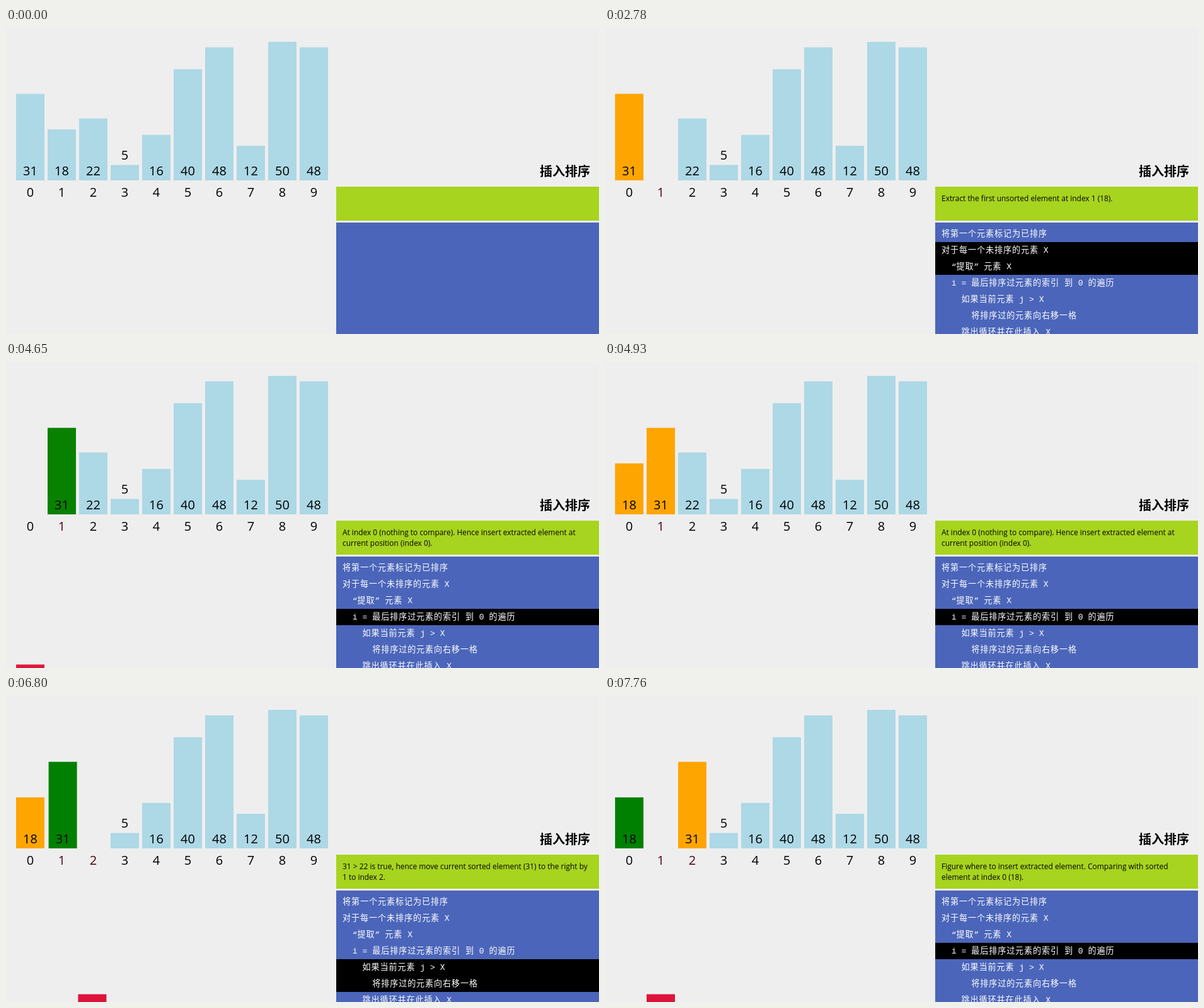
Recreate the animation shown at these times as an HTML page. Size 941x486 px, loop 8 s.

```html
<!DOCTYPE html>
<html lang="zh">
<head>
<meta charset="utf-8">
<title>插入排序</title>
<style>
  html, body { margin: 0; width: 100%; height: 100%; overflow: hidden; background: #eee; }
  svg { display: block; width: 941px; height: 486px; }
  text { white-space: pre; }
  .num { font: 20px "Open Sans", "Noto Sans", sans-serif; text-anchor: middle; }
  .title { font: bold 20px "Noto Sans CJK SC", "Noto Sans CJK", sans-serif; text-anchor: end; }
  .msg { font: 11.95px "Open Sans", "Noto Sans", sans-serif; }
  .code { font: 13.1px "Liberation Mono", monospace; fill: #fff; }
  .han { font-family: "Noto Sans CJK SC", "Noto Sans CJK", sans-serif; letter-spacing: .9px; }
</style>
</head>
<body>
<svg id="stage" width="941" height="486">
  <g id="bars"></g>
  <g id="labels"></g>
  <text class="title" x="927" y="235">插入排序</text>
  <rect x="524" y="252" width="417" height="54" fill="#a7d41e"/>
  <text class="msg" id="msg0" x="534" y="275"></text>
  <text class="msg" id="msg1" x="534" y="292"></text>
  <rect x="524" y="309" width="417" height="177" fill="#4b65ba"/>
  <rect id="mark" x="524" width="417"/>
  <g id="code"></g>
</svg>
<script>
const LOOP = 8000, DROP = 330, BASE = 242;
const BLUE = [173, 216, 230], ORANGE = [255, 165, 0], GREEN = [0, 128, 0], RED = [220, 20, 60];
const values = [31, 18, 22, 5, 16, 40, 48, 12, 50, 48];
const lines = [
  '将第一个元素标记为已排序',
  '对于每一个未排序的元素 X',
  '  “提取” 元素 X',
  '  i = 最后排序过元素的索引 到 0 的遍历',
  '    如果当前元素 j > X',
  '      将排序过的元素向右移一格',
  '    跳出循环并在此插入 X'
];

const extract = (i, v) => [`Extract the first unsorted element at index ${i} (${v}).`];
const compare = (i, v) => [
  'Figure where to insert extracted element. Comparing with sorted',
  `element at index ${i} (${v}).`
];
const shift = (a, b, to) => [
  `${a} > ${b} is true, hence move current sorted element (${a}) to the right by`,
  `1 to index ${to}.`
];

// rows: first and last highlighted code line; moves: bar index -> new state
const steps = [
  { from: 1890, to: 2100, n: 4, rows: [0, 0], msg: ['Mark index 0 (31) as sorted.'],
    moves: { 0: { color: ORANGE } } },
  { from: 2570, to: 2780, n: 4, rows: [1, 2], msg: extract(1, 18),
    moves: { 1: { color: RED, drop: DROP } } },
  { from: 3240, to: 3460, n: 4, rows: [3, 3], msg: compare(0, 31),
    moves: { 0: { color: GREEN } } },
  { from: 3990, to: 4200, n: 4, rows: [4, 5], msg: shift(31, 18, 1),
    moves: { 0: { col: 1 }, 1: { col: 0 } } },
  { from: 4650, to: 4930, n: 5, rows: [3, 3],
    msg: ['At index 0 (nothing to compare). Hence insert extracted element at',
          'current position (index 0).'],
    moves: { 0: { color: ORANGE }, 1: { color: ORANGE, drop: 0 } } },
  { from: 5390, to: 5670, n: 5, rows: [1, 2], msg: extract(2, 22),
    moves: { 2: { color: RED, drop: DROP } } },
  { from: 6070, to: 6270, n: 4, rows: [3, 3], msg: compare(1, 31),
    moves: { 0: { color: GREEN } } },
  { from: 6800, to: 7090, n: 5, rows: [4, 5], msg: shift(31, 22, 2),
    moves: { 0: { col: 2 }, 2: { col: 1 } } },
  { from: 7480, to: 7760, n: 5, rows: [3, 3], msg: compare(0, 18),
    moves: { 0: { color: ORANGE }, 1: { color: GREEN } } }
];

const $ = id => document.getElementById(id);
function add(parent, tag, attrs, text) {
  const el = document.createElementNS('http://www.w3.org/2000/svg', tag);
  for (const k in attrs) el.setAttribute(k, attrs[k]);
  if (text !== undefined) el.textContent = text;
  return parent.appendChild(el);
}

const bars = values.map(v => {
  const h = 2.75 + 4.345 * v;
  const g = add($('bars'), 'g', {});
  const rect = add(g, 'rect', { y: BASE - h, width: 45, height: h });
  add(g, 'text', { class: 'num', x: 22.5, y: h < 30 ? 209 : 234 }, v);
  return { g, rect };
});
const labels = values.map((v, i) =>
  add($('labels'), 'text', { class: 'num', x: 38.5 + 50 * i, y: 268 }, i));

lines.forEach((line, i) => {
  const text = add($('code'), 'text', { class: 'code', x: 534, y: 331 + 26 * i });
  for (const run of line.match(/[\u4e00-\u9fff]+|[^\u4e00-\u9fff]+/g))
    add(text, 'tspan', /[\u4e00-\u9fff]/.test(run) ? { class: 'han' } : {}, run);
});

const ease = t => t < .5 ? 4 * t ** 3 : 1 - 4 * (1 - t) ** 3;
const mix = (a, b, p) => Array.isArray(a) ? a.map((v, i) => mix(v, b[i], p)) : a + (b - a) * p;
const rowTop = i => i ? 314 + 26 * i : 309;

// Transitions advance in n held poses, the first already slightly under way.
function progress(step, t) {
  const gap = (step.to - step.from) / (step.n - 1);
  const k = Math.min(step.n - 1, Math.floor((t - step.from) / gap + 1e-6));
  return ease(.2 + .8 * k / (step.n - 1));
}

function draw(t) {
  const state = values.map((v, i) => ({ col: i, drop: 0, color: BLUE }));
  let current = null;
  for (const step of steps) {
    if (t < step.from) break;
    current = step;
    const p = progress(step, t);
    for (const i in step.moves)
      for (const key in step.moves[i])
        state[i][key] = mix(state[i][key], step.moves[i][key], p);
  }
  state.forEach((s, i) => {
    bars[i].g.setAttribute('transform', `translate(${16 + 50 * s.col} ${s.drop})`);
    bars[i].rect.setAttribute('fill', `rgb(${s.color.map(Math.round)})`);
  });
  labels[1].setAttribute('fill', t >= 2710 ? '#500010' : '#000');
  labels[2].setAttribute('fill', t >= 5600 ? '#500010' : '#000');

  const msg = current ? current.msg : [];
  $('msg0').textContent = msg[0] || '';
  $('msg1').textContent = msg[1] || '';
  const top = current ? rowTop(current.rows[0]) : 0;
  $('mark').setAttribute('y', top);
  $('mark').setAttribute('height', current ? rowTop(current.rows[1] + 1) - top : 0);
  $('code').setAttribute('visibility', t >= 500 ? 'visible' : 'hidden');
}

const start = performance.now();
function tick() {
  draw((performance.now() - start) % LOOP);
  requestAnimationFrame(tick);
}
tick();
</script>
</body>
</html>
```
